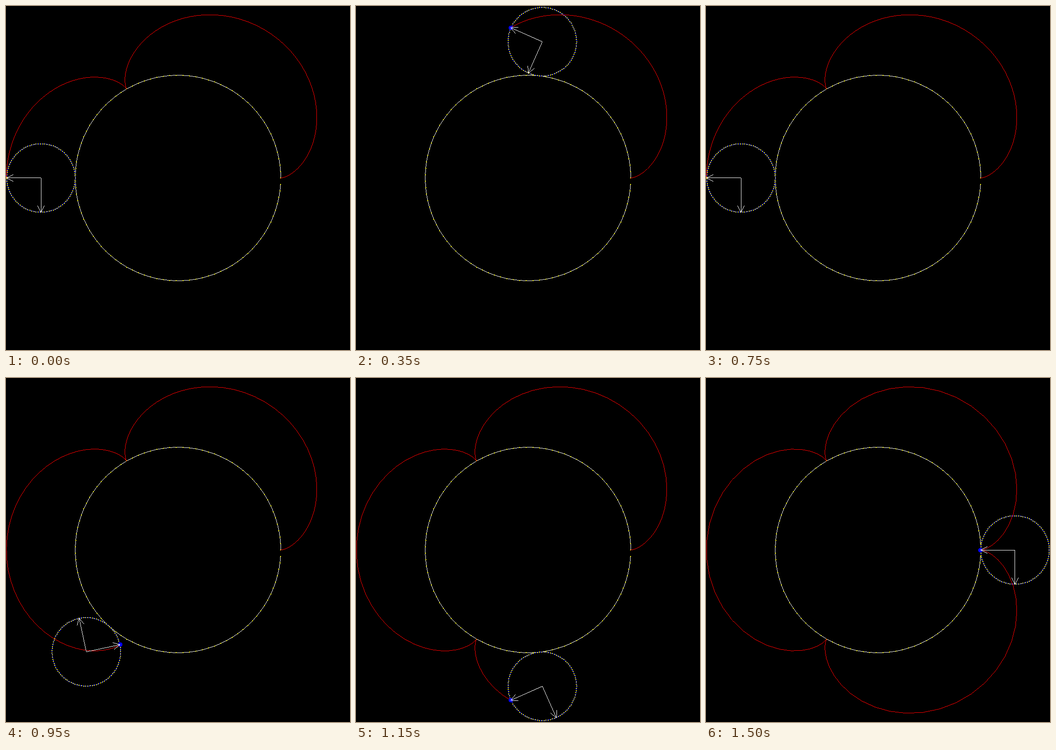
An HTML page with a canvas that plays this animation: 748 by 748 pixels, repeating every 1550 ms.

```html
<!DOCTYPE html>
<html lang="en">
<head>
<meta charset="utf-8">
<title>Epicycloid</title>
<style>
  html, body { margin: 0; width: 100%; height: 100%; overflow: hidden; background: #000; }
  canvas { display: block; }
</style>
</head>
<body>
<canvas id="stage" width="748" height="748"></canvas>
<script>
const ctx = document.getElementById('stage').getContext('2d');
const SIZE = 748, MID = 374;
const UNIT = 74.48, ARM = 75.3;
const STEP_MS = 50, STEPS = 31, STEP_DEG = 12;
const POINTS = 99, TAU = Math.PI * 2;

const polar = (radius, angle, from = { x: MID, y: MID }) => ({
  x: from.x + radius * Math.cos(angle),
  y: from.y - radius * Math.sin(angle)
});

const wheelCenter = theta => polar(4 * UNIT, theta);
const tracePoint = theta => polar(-ARM, 4 * theta, wheelCenter(theta));

// Hard-edged line: one pixel per column or row, sampled at pixel centres
function line(a, b, color) {
  ctx.fillStyle = color;
  const wide = Math.abs(b.x - a.x) >= Math.abs(b.y - a.y);
  const [major, minor] = wide ? ['x', 'y'] : ['y', 'x'];
  if (a[major] > b[major]) [a, b] = [b, a];
  const slope = (b[minor] - a[minor]) / (b[major] - a[major] || 1);
  for (let p = Math.round(a[major]); p < Math.round(b[major]); p++) {
    const q = Math.floor(a[minor] + (p + 0.5 - a[major]) * slope);
    if (wide) ctx.fillRect(p, q, 1, 1);
    else ctx.fillRect(q, p, 1, 1);
  }
}

function polyline(points, color) {
  for (let i = 1; i < points.length; i++) line(points[i - 1], points[i], color);
}

function dot(p, color) {
  ctx.fillStyle = color;
  ctx.fillRect(Math.round(p.x) - 1, Math.round(p.y) - 1, 2, 2);
}

function disc(p, radius, color) {
  ctx.fillStyle = color;
  const x = Math.floor(p.x), y = Math.floor(p.y);
  for (let dy = -Math.floor(radius); dy <= radius; dy++) {
    const half = Math.floor(Math.sqrt(radius * radius - dy * dy));
    ctx.fillRect(x - half, y + dy, 2 * half + 1, 1);
  }
}

function arrow(from, angle) {
  const tip = polar(ARM, angle, from);
  const back = polar(-0.2 * ARM, angle, tip);
  line(from, tip, '#fff');
  for (const side of [-1, 1]) {
    line(tip, polar(side * 0.1 * ARM, angle + Math.PI / 2, back), '#fff');
  }
}

function fixedCircle() {
  const points = Array.from({ length: POINTS }, (_, i) => polar(3 * UNIT, i * TAU / POINTS));
  polyline(points, '#fff');
  for (const p of points) dot(p, '#ff0');
}

function wheel(center) {
  for (let i = 0; i < POINTS; i++) {
    dot(polar(UNIT, (i + 0.5) * TAU / POINTS, center), '#00f');
    dot(polar(UNIT, i * TAU / POINTS, center), '#ff0');
  }
}

function trace(theta) {
  const points = Array.from({ length: POINTS + 1 }, (_, i) => tracePoint(theta * i / POINTS));
  polyline(points, '#f00');
}

function draw(step) {
  // The loop opens on a still of the half turn
  const theta = (step || 15) * STEP_DEG * Math.PI / 180;
  const center = wheelCenter(theta), pen = tracePoint(theta);
  ctx.fillStyle = '#000';
  ctx.fillRect(0, 0, SIZE, SIZE);
  fixedCircle();
  wheel(center);
  trace(theta);
  if (pen.x > 1) disc(pen, 4.5, '#00f');
  arrow(center, 4 * theta + Math.PI);
  arrow(center, 4 * theta + Math.PI * 1.5);
}

const start = performance.now();
let shown = -1;
function tick() {
  const step = Math.floor((performance.now() - start) / STEP_MS) % STEPS;
  if (step !== shown) draw(shown = step);
  requestAnimationFrame(tick);
}
tick();
</script>
</body>
</html>
```
